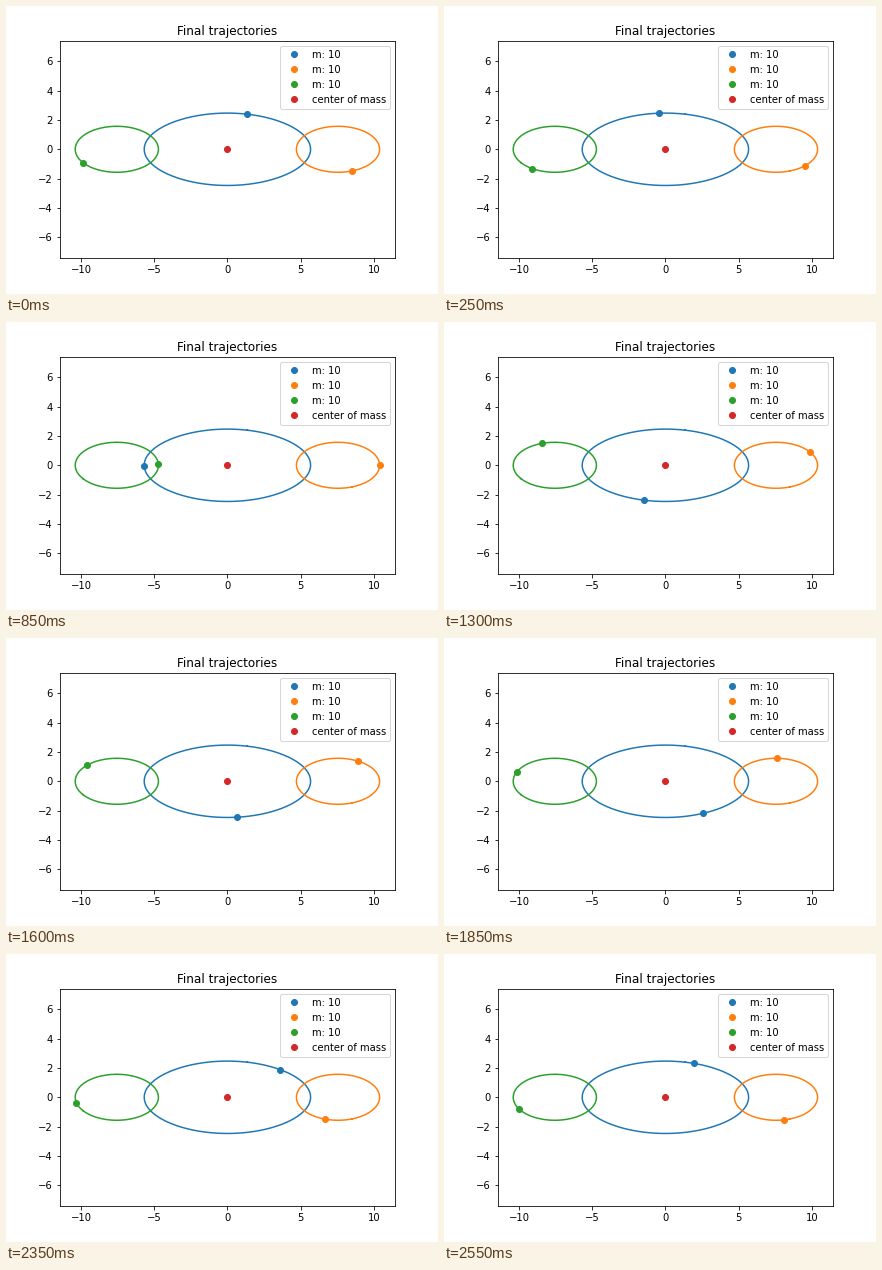
A matplotlib script that plays this animation: 432x288 px, repeating every 2.6 s.

```python
import numpy as np
import matplotlib.pyplot as plt
from matplotlib.animation import FuncAnimation

FRAMES = 52
PERIOD = 52.5      # orbital period, in frames
START = 16.94      # moment when the right body is farthest out
ECC = 0.845        # how strongly the bodies speed up at the close passes
CENTER, SEMI_X, SEMI_Y = 7.55, 2.84, 1.57
COLORS = ["tab:blue", "tab:orange", "tab:green"]


def outer(t):
    """Place on the right ellipse, timed by Kepler's equation."""
    mean = np.mod(np.pi + 2 * np.pi * (t - START) / PERIOD, 2 * np.pi)
    lo, hi = np.zeros_like(mean), np.full_like(mean, 2 * np.pi)
    for _ in range(45):
        mid = (lo + hi) / 2
        low = mid - ECC * np.sin(mid) < mean
        lo, hi = np.where(low, mid, lo), np.where(low, hi, mid)
    angle = (lo + hi) / 2 - np.pi
    return np.array([CENTER + SEMI_X * np.cos(angle), SEMI_Y * np.sin(angle)])


def bodies(t):
    """The outer pair mirrors itself; the middle body balances them."""
    t = np.asarray(t, dtype=float)
    right = outer(t)
    left = -outer(t - PERIOD / 2)
    return [-(right + left), right, left]


plt.rcParams.update({"font.family": "DejaVu Sans", "font.size": 10})
fig = plt.figure(figsize=(6, 4), dpi=72, facecolor="white")
fig.subplots_adjust(left=0.125, right=0.9, bottom=0.125, top=0.88)
ax = fig.add_subplot()

for (x, y), color in zip(bodies(np.linspace(0, PERIOD, 2001)), COLORS):
    ax.plot(x, y, color=color, lw=1.5)

dots = [ax.plot([], [], "o", color=color, ms=6, label="m: 10")[0]
        for color in COLORS]
ax.plot([0], [0], "o", color="tab:red", ms=6, label="center of mass")

half_w = 1.1 * (CENTER + SEMI_X)
box = ax.get_position()
half_h = half_w * (box.height * 4) / (box.width * 6)
ax.set_xlim(-half_w, half_w)
ax.set_ylim(-half_h, half_h)
ax.set_xticks(range(-10, 11, 5))
ax.set_yticks(range(-6, 7, 2))
ax.set_title("Final trajectories")
ax.legend(loc="upper right")


def update(frame):
    for dot, (x, y) in zip(dots, bodies(frame)):
        dot.set_data([x], [y])
    return dots


anim = FuncAnimation(fig, update, frames=FRAMES, interval=50,
                     repeat=True, repeat_delay=0)
plt.show()
```
